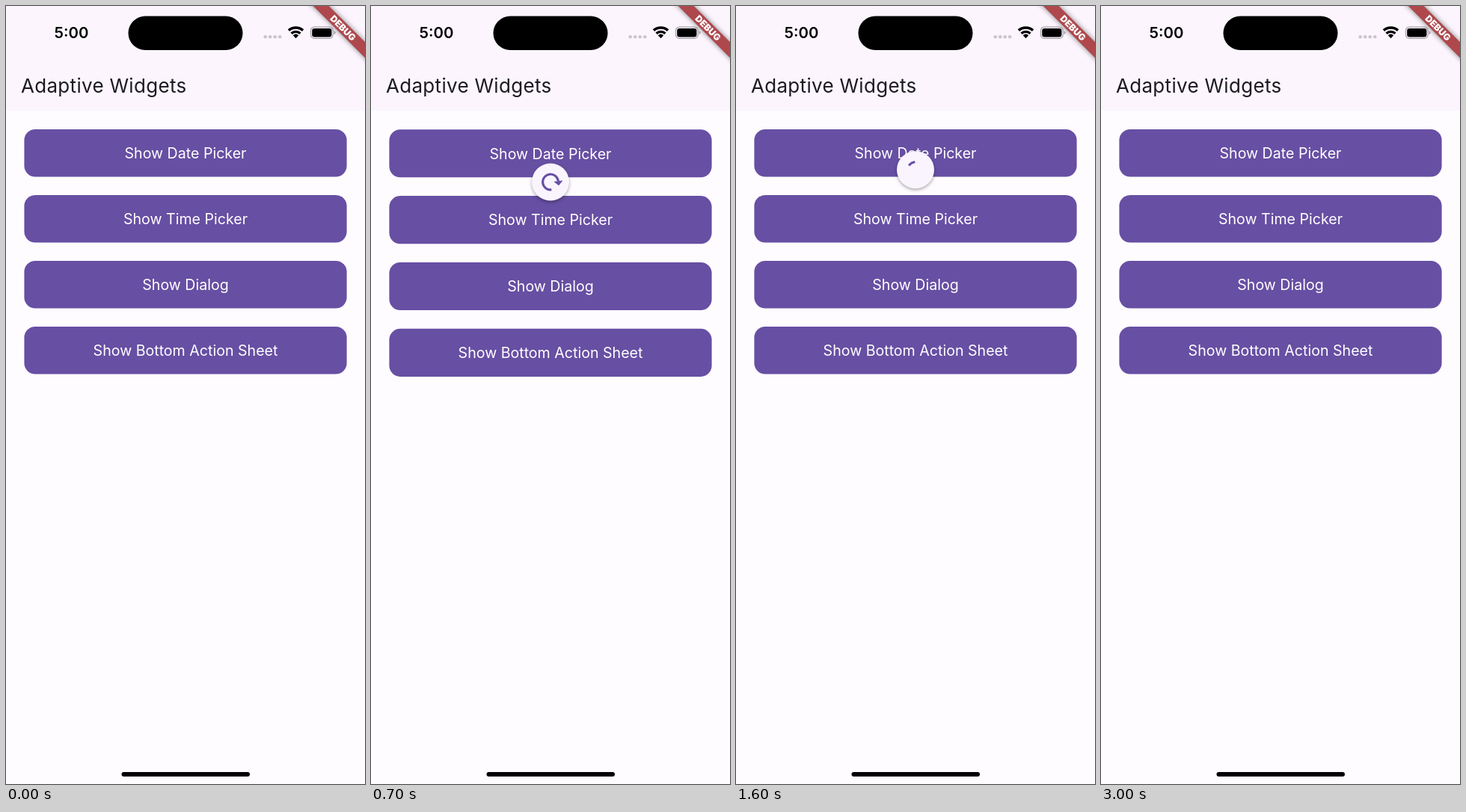
Animation of 480 by 1041 pixels, one loop 3.1 s. Source, as an HTML page:

```html
<!DOCTYPE html>
<html lang="en">
<head>
<meta charset="utf-8">
<title>Adaptive Widgets</title>
<style>
  html, body { margin: 0; width: 100%; height: 100%; overflow: hidden; background: #fefcff; }
  svg { display: block; width: 480px; height: 1041px; font-family: Inter, "Open Sans", sans-serif; }
  .label { font-size: 19.6px; fill: #fff; text-anchor: middle; }
  .title { font-size: 26px; letter-spacing: .3px; fill: #1d1b20; }
  .clock { font-size: 20.4px; font-weight: 600; text-anchor: middle; }
  .ribbon { font-size: 12.2px; font-weight: 900; fill: #fff; text-anchor: middle; }
  .disc { fill: #faf4ff; filter: drop-shadow(0 2px 2px rgba(0, 0, 0, .32)); }
  .blur { filter: blur(3.5px); }
</style>
</head>
<body>
<svg viewBox="0 0 480 1041">
  <defs>
    <clipPath id="body"><rect y="140" width="480" height="901"/></clipPath>
  </defs>
  <rect width="480" height="1041" fill="#fefcff"/>
  <rect width="480" height="140" fill="#fcf5fe"/>
  <text class="title" x="20" y="116">Adaptive Widgets</text>

  <text class="clock" x="87.5" y="43.4">5:00</text>
  <rect x="163.5" y="13.5" width="153" height="45.5" rx="22.7"/>
  <g fill="#cbc5cd">
    <circle cx="346.7" cy="41.2" r="2.3"/><circle cx="353.2" cy="41.2" r="2.3"/>
    <circle cx="359.7" cy="41.2" r="2.3"/><circle cx="366.2" cy="41.2" r="2.3"/>
  </g>
  <g id="wifi" fill="none" stroke="#000"></g>
  <rect x="407.4" y="28.1" width="29.8" height="15.2" rx="4.8" fill="none" stroke="#a5a0a7" stroke-width="1.2"/>
  <rect x="409.2" y="29.9" width="26.2" height="11.6" rx="3.2"/>
  <path d="M438.6 33.2q2 .7 2 2.5t-2 2.5z" fill="#a5a0a7"/>

  <g clip-path="url(#body)">
    <g id="list"></g>
    <g id="spinner">
      <circle class="disc" r="25"/>
      <path id="arc" fill="none" stroke="#674fa3" stroke-width="3.05"/>
      <path id="arrow" fill="#674fa3"/>
    </g>
  </g>

  <rect x="154.5" y="1025" width="171.5" height="6" rx="3"/>

  <g transform="translate(480 0) rotate(45)">
    <rect class="blur" x="-60" y="34.2" width="120" height="14.7" fill="#000" opacity=".5"/>
    <rect x="-60" y="34.2" width="120" height="14.7" fill="#ae484c"/>
    <text class="ribbon" y="46">DEBUG</text>
  </g>
</svg>
<script>
  const LOOP = 3100, STEP = 100, TOP = 140, PT = 480 / 393;
  const RADIUS = 10.4, STROKE = 3.05;
  const $ = id => document.getElementById(id);
  const clamp = x => Math.min(1, Math.max(0, x));

  // One value per step, beginning at 400 ms
  const PULL = [0.45, 1.2, 1.5, 1.15];
  const STRETCH = [0.004, 0.011, 0.0132, 0.0098, 0.0055, 0.0025];

  const polar = (deg, r) => {
    const a = deg * Math.PI / 180;
    return [r * Math.cos(a), r * Math.sin(a)];
  };

  function arcPath(start, sweep, r) {
    const [x0, y0] = polar(start, r), [x1, y1] = polar(start + sweep, r);
    return `M${x0} ${y0}A${r} ${r} 0 ${sweep > 180 ? 1 : 0} 1 ${x1} ${y1}`;
  }

  function arrowPath(deg, scale) {
    const size = STROKE * 2 * scale;
    const [ux, uy] = polar(deg, 1);
    const tip = [ux * RADIUS - uy * size, uy * RADIUS + ux * size];
    return `M${polar(deg, RADIUS - size)}L${polar(deg, RADIUS + size)}L${tip}Z`;
  }

  // cubic-bezier(.4, 0, .2, 1), solved by bisection
  function ease(x) {
    if (x <= 0 || x >= 1) return clamp(x);
    let lo = 0, hi = 1, s;
    for (let i = 0; i < 24; i++) {
      s = (lo + hi) / 2;
      const px = 1.2 * (1 - s) ** 2 * s + 0.6 * (1 - s) * s * s + s ** 3;
      if (px < x) lo = s; else hi = s;
    }
    return 3 * (1 - s) * s * s + s ** 3;
  }

  function drawDrag(pull) {
    const value = pull / 2;
    const turn = -36 + 522 * Math.max(0, value - 0.33) / 0.67;
    const sweep = Math.max(0.1, 270 * clamp((value - 0.1) / 0.23));
    const start = turn - 72;
    $('arc').setAttribute('d', arcPath(start, sweep, RADIUS));
    $('arc').setAttribute('stroke-linecap', 'butt');
    $('arc').setAttribute('opacity', clamp(pull));
    $('arrow').setAttribute('d', arrowPath(start + sweep, clamp(pull)));
    $('arrow').setAttribute('opacity', clamp(pull));
  }

  function drawSpin(t) {
    const since = t - 1000;
    const phase = (0.65 + since / 1333 + 1) % 1;
    const head = ease(phase * 2), tail = ease(phase * 2 - 1);
    const start = -244.5 + 270 * tail + 90 * phase + 0.162 * since;
    $('arc').setAttribute('d', arcPath(start, Math.max(0.1, 270 * (head - tail)), RADIUS));
    $('arc').setAttribute('stroke-linecap', 'square');
    $('arc').setAttribute('opacity', 1);
    $('arrow').setAttribute('d', '');
  }

  function draw(t) {
    const step = (t - 400) / STEP;
    const stretch = 1 + (STRETCH[step] || 0);
    $('list').setAttribute('transform', `translate(0 ${TOP}) scale(1 ${stretch})`);

    const visible = t >= 400 && t < 3000;
    $('spinner').style.display = visible ? '' : 'none';
    if (!visible) return;

    const pull = PULL[step] || 1;
    const y = TOP + (89 * pull - 24.5) * PT + 0.4;
    const scale = clamp(1 - (t - 2750) / 200);
    $('spinner').setAttribute('transform', `translate(240 ${y}) scale(${scale})`);
    if (step < PULL.length) drawDrag(pull); else drawSpin(t);
  }

  $('list').innerHTML = ['Date Picker', 'Time Picker', 'Dialog', 'Bottom Action Sheet']
    .map((name, i) => `<rect x="24.4" y="${25 + 88 * i}" width="431.2" height="63.5" rx="14.7" fill="#674fa3"/>
      <text class="label" x="240" y="${64 + 88 * i}">Show ${name}</text>`).join('');

  $('wifi').innerHTML = [[14.3, 3.5], [8.9, 3.4], [2.8, 5.6]]
    .map(([r, w]) => `<path transform="translate(387.5 43.3)" stroke-width="${w}" d="${arcPath(228, 84, r)}"/>`).join('');

  const begin = performance.now();
  function tick() {
    const t = (performance.now() - begin) % LOOP;
    draw(Math.floor(t / STEP) * STEP);
    requestAnimationFrame(tick);
  }
  draw(0);
  requestAnimationFrame(tick);
</script>
</body>
</html>
```
